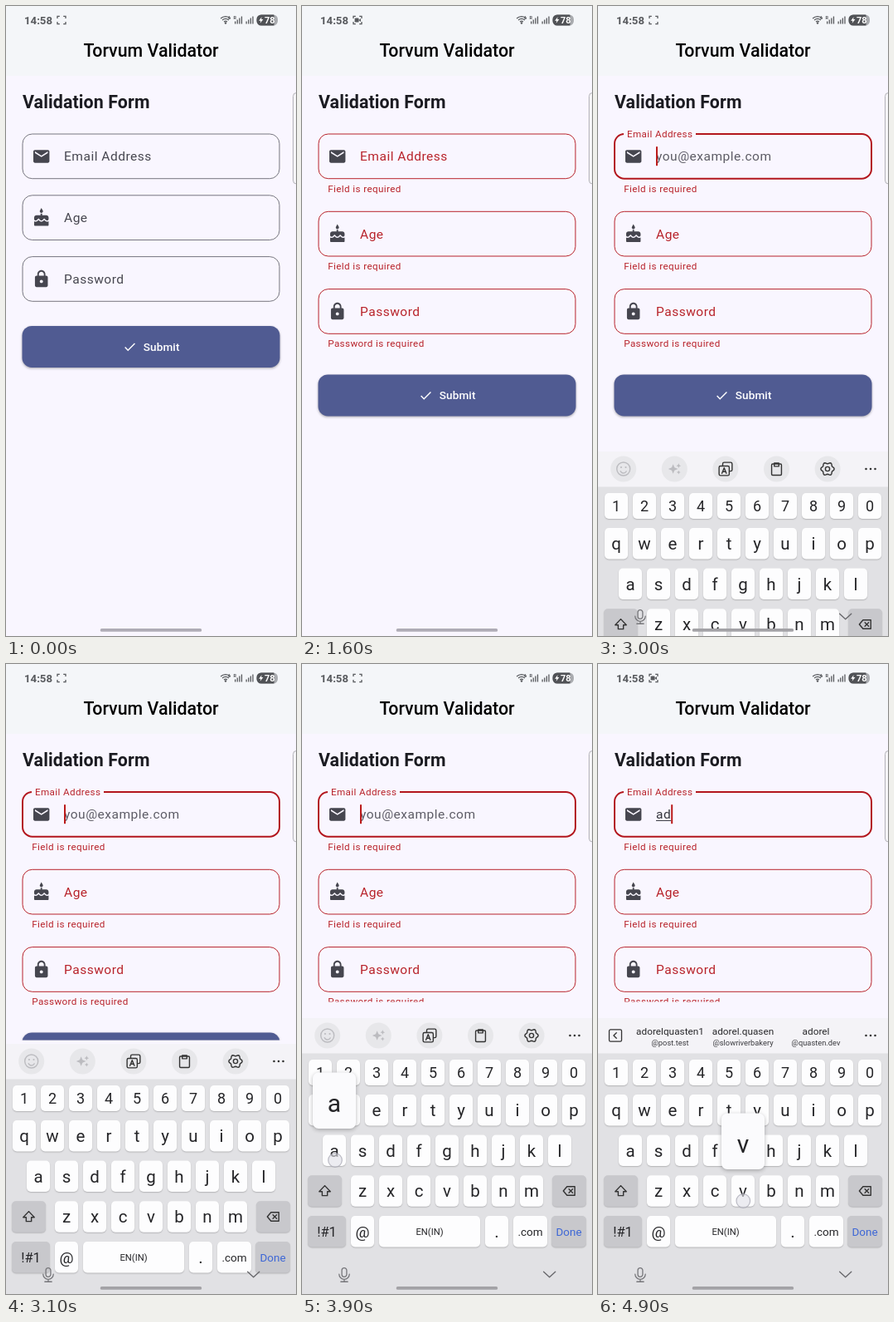
These frames come from a looping animation (350x758 px, 5 s). An HTML page with a canvas:

```html
<!DOCTYPE html>
<html lang="en">
<head>
<meta charset="utf-8">
<title>Validation form</title>
<style>
html, body { margin: 0; width: 100%; height: 100%; overflow: hidden; background: #f9f6ff; }
canvas { display: block; width: 350px; height: 758px; }
</style>
</head>
<body>
<canvas id="stage"></canvas>
<script>
const W = 350, H = 758, LOOP = 5000, STEP = 100;
const BG = '#f9f6ff', INK = '#46464f', RED = '#b8232a', DARK = '#1b1b21', STATUS = '#57595d';
const canvas = document.getElementById('stage');
const ctx = canvas.getContext('2d');
const ratio = window.devicePixelRatio || 1;
canvas.width = W * ratio;
canvas.height = H * ratio;

const ICONS = {
  mail: 'M20 4H4c-1.1 0-2 .9-2 2v12c0 1.1.9 2 2 2h16c1.1 0 2-.9 2-2V6c0-1.1-.9-2-2-2zm0 4l-8 5-8-5V6l8 5 8-5v2z',
  cake: 'M12 6c1.1 0 2-.9 2-2 0-.4-.1-.7-.3-1L12 0l-1.7 3c-.2.3-.3.6-.3 1 0 1.1.9 2 2 2zM16.6 16l-1.1-1.1-1.1 1.1c-1.3 1.3-3.6 1.3-4.9 0l-1-1.1L7.4 16c-1.2 1.2-3.1 1.3-4.4.4V21c0 .6.4 1 1 1h16c.6 0 1-.4 1-1v-4.6c-1.3.9-3.2.8-4.4-.4zM18 9h-5V7h-2v2H6c-1.7 0-3 1.3-3 3v1.5c0 1.8 2.1 2.6 3.3 1.4l2.2-2.1 2.1 2.1c.7.7 2 .7 2.8 0l2.1-2.1 2.2 2.1c1.2 1.2 3.3.4 3.3-1.4V12c0-1.7-1.3-3-3-3z',
  lock: 'M18 8h-1V6c0-2.8-2.2-5-5-5S7 3.2 7 6v2H6c-1.1 0-2 .9-2 2v10c0 1.1.9 2 2 2h12c1.1 0 2-.9 2-2V10c0-1.1-.9-2-2-2zm-6 9c-1.1 0-2-.9-2-2s.9-2 2-2 2 .9 2 2-.9 2-2 2zm3.1-9H8.9V6c0-1.7 1.4-3.1 3.1-3.1s3.1 1.4 3.1 3.1v2z',
  check: 'M9 16.2L4.8 12l-1.4 1.4L9 19 21 7l-1.4-1.4z',
  spark: 'M10 5l2 5 5 2-5 2-2 5-2-5-5-2 5-2zM18 4l1 2.4 2.4 1-2.4 1-1 2.4-1-2.4-2.4-1 2.4-1zM18 14l.9 2 2 .9-2 .9-.9 2-.9-2-2-.9 2-.9z',
  bolt: 'M14 2L5 14h6l-2 8 10-13h-6z',
  shift: 'M12 3.5L3 13h4.8v6.5h8.4V13H21z',
  erase: 'M8.5 5H21v14H8.5L2.5 12zM11.5 9l6 6M17.5 9l-6 6',
  clip: 'M6 4.5h12a1.5 1.5 0 0 1 1.5 1.5v14a1.5 1.5 0 0 1-1.5 1.5H6A1.5 1.5 0 0 1 4.5 20V6A1.5 1.5 0 0 1 6 4.5zM8.5 3h7v5h-7z',
  swap: 'M8 7V5a2 2 0 0 1 2-2h9a2 2 0 0 1 2 2v8a2 2 0 0 1-2 2h-1M5 8h10a2 2 0 0 1 2 2v9a2 2 0 0 1-2 2H5a2 2 0 0 1-2-2v-9a2 2 0 0 1 2-2zM7 18l3-7.500 3 7.500M8 15.700h4',
  mic: 'M12 2.500a3.500 3.500 0 0 1 3.500 3.500v6a3.500 3.500 0 0 1-7 0V6A3.500 3.500 0 0 1 12 2.500zM4.500 11.500a7.500 7.500 0 0 0 15 0M12 19v3.500M7 22.500h10',
  down: 'M3.500 8l8.500 8 8.500-8',
  back: 'M5 3.500h14a2 2 0 0 1 2 2v13a2 2 0 0 1-2 2H5a2 2 0 0 1-2-2v-13a2 2 0 0 1 2-2zM13.500 8l-4 4 4 4'
};

const clamp = v => Math.max(0, Math.min(1, v));
const ease = v => { const p = clamp(v); return 1 - (1 - p) ** 3; };
const mix = (a, b, p) => a + (b - a) * p;
const within = (t, a, b) => t >= a && t < b;

// y is the middle of the capital letters
function text(str, x, y, size, color, o = {}) {
  ctx.font = `${o.weight || 400} ${size}px Roboto, sans-serif`;
  ctx.letterSpacing = (o.space || 0) + 'px';
  ctx.textAlign = o.align || 'left';
  ctx.fillStyle = color;
  ctx.fillText(str, x, y + size * 0.356);
  return ctx.measureText(str).width;
}
const centered = (str, x, y, size, color, weight) => text(str, x, y, size, color, { align: 'center', weight });

function box(x, y, w, h, r, fill, stroke, line = 1) {
  ctx.beginPath();
  ctx.roundRect(x, y, w, h, r);
  if (fill) { ctx.fillStyle = fill; ctx.fill(); }
  if (stroke) { ctx.strokeStyle = stroke; ctx.lineWidth = line; ctx.stroke(); }
}

function dot(x, y, r, fill, stroke, line = 1) {
  ctx.beginPath();
  ctx.arc(x, y, r, 0, 7);
  if (fill) { ctx.fillStyle = fill; ctx.fill(); }
  if (stroke) { ctx.strokeStyle = stroke; ctx.lineWidth = line; ctx.stroke(); }
}

function icon(name, x, y, size, color, line = 0) {
  const path = new Path2D(ICONS[name]), k = size / 24;
  ctx.save();
  ctx.translate(x - size / 2, y - size / 2);
  ctx.scale(k, k);
  ctx.lineJoin = ctx.lineCap = 'round';
  ctx.fillStyle = ctx.strokeStyle = color;
  ctx.lineWidth = line / k;
  if (line) ctx.stroke(path); else ctx.fill(path);
  ctx.restore();
}

function shadowed(color, blur, dy, draw) {
  ctx.save();
  ctx.shadowColor = color;
  ctx.shadowBlur = blur * ratio;
  ctx.shadowOffsetY = dy * ratio;
  draw();
  ctx.restore();
}

function bars(x, base, n) {
  ctx.fillStyle = STATUS;
  for (let i = 0; i < n; i++) ctx.fillRect(x + i * 2.6, base - 3 - i * 2, 1.3, 3 + i * 2);
}

function statusBar(t) {
  text('14:58', 22, 17.3, 13.2, STATUS, { weight: 600 });
  ctx.strokeStyle = STATUS;
  ctx.lineWidth = 1.3;
  for (const sx of [-1, 1]) for (const sy of [-1, 1]) {
    ctx.beginPath();
    ctx.moveTo(67 + sx * 5, 17 + sy * 1.9);
    ctx.lineTo(67 + sx * 5, 17 + sy * 4.6);
    ctx.lineTo(67 + sx * 2.2, 17 + sy * 4.6);
    ctx.stroke();
  }
  const recording = [[600, 1000], [1500, 2000], [2400, 2900], [3400, 3800], [4400, 5000]];
  if (recording.some(([a, b]) => within(t, a, b))) {
    box(63.6, 14.6, 5, 5, 1.2, STATUS);
    ctx.beginPath();
    ctx.moveTo(68.4, 17);
    ctx.lineTo(71, 15);
    ctx.lineTo(71, 19);
    ctx.fill();
  }
  for (let i = 0; i < 3; i++) {
    ctx.beginPath();
    ctx.arc(265, 21, 2.8 + i * 2.8, -2.35, -0.8);
    ctx.lineWidth = 1.2;
    ctx.strokeStyle = STATUS;
    ctx.stroke();
  }
  dot(265, 20.5, 1.2, STATUS);
  text('6', 268, 14, 5, STATUS, { weight: 700 });
  text('R', 274.5, 13.8, 5.5, STATUS, { weight: 700 });
  bars(276, 21.5, 4);
  bars(289.5, 21.5, 4);
  box(302.5, 10.5, 25.5, 13, 5.5, '#a9abaf');
  ctx.save();
  ctx.beginPath();
  ctx.rect(302, 10, 21.5, 14);
  ctx.clip();
  box(302.5, 10.5, 25.5, 13, 5.5, '#505256');
  ctx.restore();
  icon('bolt', 307.8, 17, 9, '#fff');
  text('78', 312, 17.1, 11, '#fff', { weight: 700 });
}

function field(f, y, err, focus, t) {
  const red = err > 0;
  const edge = red ? `rgb(${mix(118, 184, err)},${mix(118, 35, err)},${mix(126, 42, err)})` : '#77767f';
  const line = focus ? mix(1, 1.95, focus) : 1;
  box(20, y, 310, 53.7, 11.7, null, focus ? '#b3161d' : edge, line);
  icon(f.icon, 42.7, y + 26.9, 23.3, INK);
  const labelColor = red ? (err < 0.5 ? INK : RED) : INK;
  if (focus) {
    ctx.fillStyle = BG;
    ctx.fillRect(31, y - 2, 87 * focus, 4);
  }
  text(f.label, mix(70, 35, focus), mix(y + 26.7, y + 0.3, focus), mix(15.55, 11.66, focus), labelColor,
    { space: mix(0.49, 0.37, focus) });
  if (red) {
    ctx.globalAlpha = err;
    text(f.error, 31.2, y + 65.7 - 3 * (1 - err), 11.66, RED, { space: 0.39 });
    ctx.globalAlpha = 1;
  }
  if (focus) input(y, focus, t);
}

function input(y, focus, t) {
  const typed = t >= 4600 ? 'ad' : t >= 4000 ? 'a' : '';
  const mid = y + 26.7;
  let end = 70;
  if (typed) {
    const w = text(typed, 70, mid, 15.55, '#34343c', { space: 0.49 });
    ctx.fillRect(70, mid + 7.2, w, 1);
    end += w;
  } else {
    ctx.globalAlpha = focus ** 3;
    text('you@example.com', 70, mid, 15.55, '#5d5c65', { space: 0.49 });
    ctx.globalAlpha = 1;
  }
  if (!within(t, 3300, 3800)) {
    ctx.fillStyle = '#ba1a1a';
    ctx.fillRect(end, mid - 11.5, 2, 23);
  }
}

const FIELDS = [
  { icon: 'mail', label: 'Email Address', error: 'Field is required' },
  { icon: 'cake', label: 'Age', error: 'Field is required' },
  { icon: 'lock', label: 'Password', error: 'Password is required' }
];

function form(t, slide) {
  const err = ease((t - 1440) / 170);
  const focus = ease((t - 2760) / 170);
  const pitch = err > 0 ? 93.3 : 73.8;
  ctx.save();
  ctx.beginPath();
  ctx.rect(0, 84, W, t < 2900 ? H : 322.500 + slide * 1.48);
  ctx.clip();
  text('Validation Form', 20, 115, 21.4, DARK, { weight: 600, space: 0.1 });
  FIELDS.forEach((f, i) => field(f, 154 + i * pitch, err, i ? 0 : focus, t));
  const y = 163.5 + pitch * 3;
  shadowed('rgba(0,0,0,.32)', 3, 1.2, () => box(19.5, y, 311, 50, 11.7, '#505b92'));
  icon('check', 149.4, y + 25.2, 17.5, '#fff');
  text('Submit', 165.7, y + 25.2, 13.6, '#fff', { weight: 500, space: 0.1 });
  ctx.restore();
}

function key(label, x, y, w, h, size, o = {}) {
  shadowed('rgba(0,0,0,.2)', 1.5, 1, () => box(x - w / 2, y - h / 2, w, h, 5, o.fill || '#fdfdfe'));
  if (o.icon) icon(o.icon, x, y, 18, '#333', 1.4);
  else centered(label, x, y, size, o.color || '#252528');
}

function gear(x, y) {
  ctx.beginPath();
  for (let i = 0; i <= 48; i++) {
    const a = i / 48 * Math.PI * 2;
    const r = 7.2 + 0.9 * Math.cos(a * 6 + Math.PI);
    ctx.lineTo(x + r * Math.sin(a), y + r * Math.cos(a));
  }
  ctx.strokeStyle = '#333';
  ctx.lineWidth = 1.4;
  ctx.stroke();
  dot(x, y, 2.6, null, '#333', 1.4);
}

function toolbar(t) {
  const y = 447;
  for (const x of [323.5, 329, 334.5]) dot(x, y, 1.3, '#333');
  if (t >= 4100) {
    icon('back', 21, y, 20, '#333', 1.3);
    const tips = [['adorelquasten1', '@post.test'], ['adorel.quasen', '@slowriverbakery'], ['adorel', '@quasten.dev']];
    tips.forEach(([name, host], i) => {
      centered(name, 87 + i * 88, 441.5, 11.8, '#29292c');
      centered(host, 87 + i * 88, 455.3, 9.3, '#3b3b3f');
    });
    return;
  }
  for (let i = 0; i < 5; i++) dot(30.7 + i * 61.6, y, 15.5, '#e7e7ea');
  const pale = '#bcbcc0';
  dot(30.7, y, 8, null, pale, 1.4);
  dot(27.9, 445, 1.1, pale);
  dot(33.5, 445, 1.1, pale);
  ctx.beginPath();
  ctx.arc(30.7, 448, 4, 0.35, 2.8);
  ctx.stroke();
  icon('spark', 92.3, y, 20, pale);
  icon('swap', 154, y, 21, '#333', 1.4);
  icon('clip', 215.5, y, 19, '#333', 1.4);
  gear(277, y);
}

function keyboard(t, slide) {
  ctx.save();
  ctx.translate(0, slide);
  ctx.fillStyle = '#f4f3f7';
  ctx.fillRect(0, 426, W, 43);
  ctx.fillStyle = '#e1e1e4';
  ctx.fillRect(0, 468.5, W, H);
  toolbar(t);
  const row = (keys, x, y, h, size) => [...keys].forEach((c, i) => key(c, x + i * 34, y, 28, h, size));
  row('1234567890', 22, 491.5, 31, 18);
  row('qwertyuiop', 22, 536.8, 37.5, 20.5);
  row('asdfghjkl', 39, 585.3, 37.5, 20.5);
  row('zxcvbnm', 73, 634, 37.5, 20.5);
  const gray = '#c8c8cc', y = 682.8, h = 37.5;
  key('', 27.5, 634, 41, h, 0, { icon: 'shift', fill: gray });
  key('', 322.5, 634, 41, h, 0, { icon: 'erase', fill: gray });
  key('!#1', 30, y, 46, h, 16.5, { fill: gray });
  key('@', 73, y, 28, h, 19);
  key('EN(IN)', 154, y, 122, h, 11.2);
  key('.', 235, y, 28, h, 21);
  key('.com', 275.5, y, 41, h, 13.5);
  key('Done', 322, y, 42, h, 13.5, { fill: gray, color: '#3f68d6' });
  const pops = [[3800, 4000, 'a', 39, 566], [4400, 4600, 'd', 107, 566], [4800, 5000, 'v', 175, 615]];
  for (const [a, b, c, x, top] of pops) {
    if (!within(t, a, b)) continue;
    shadowed('rgba(0,0,0,.28)', 5, 1.5, () => box(x - 26, top - 74.5, 52, 67.5, 7, '#fbfbfd'));
    centered(c, x, top - 38, 30, '#252528');
  }
  ctx.restore();
  icon('mic', 51, 734.5, 20, '#77777b', 1.3);
  icon('down', 298.7, 734.5, 20, '#66666a', 1.3);
}

function touches(t) {
  const taps = [[1200, 1500, 76, 417], [2700, 2800, 152, 184], [3800, 4000, 40, 597],
    [4400, 4600, 108, 597], [4800, 5000, 175.3, 646]];
  for (const [a, b, x, y] of taps) {
    if (within(t, a, b)) dot(x, y, 8.3, 'rgba(226,226,232,.62)', 'rgba(165,165,178,.75)', 1.2);
  }
}

// remaining distance of the keyboard while it rises
function slideAt(t) {
  if (t < 2900) return 332;
  if (t >= 3300) return 0;
  return [250, 110, 31, 5][Math.floor((t - 2900) / 100)];
}

function draw(t) {
  const slide = slideAt(t);
  ctx.setTransform(ratio, 0, 0, ratio, 0, 0);
  ctx.fillStyle = BG;
  ctx.fillRect(0, 0, W, H);
  ctx.fillStyle = '#f4f6f9';
  ctx.fillRect(0, 0, W, 84);
  statusBar(t);
  centered('Torvum Validator', 175, 53, 21.4, '#000', 500);
  form(t, slide);
  box(346.5, 104.5, 12, 109.5, 4, '#f6f5f8', '#b3b2b8');
  if (t >= 2900) keyboard(t, slide);
  touches(t);
  box(113.7, 749, 122.5, 3.8, 1.9, t >= 2900 ? '#a3a2a6' : '#afacb6');
}

const start = performance.now();
function tick() {
  const t = (performance.now() - start) % LOOP;
  draw(Math.floor(t / STEP) * STEP);
  requestAnimationFrame(tick);
}
tick();
</script>
</body>
</html>
```
